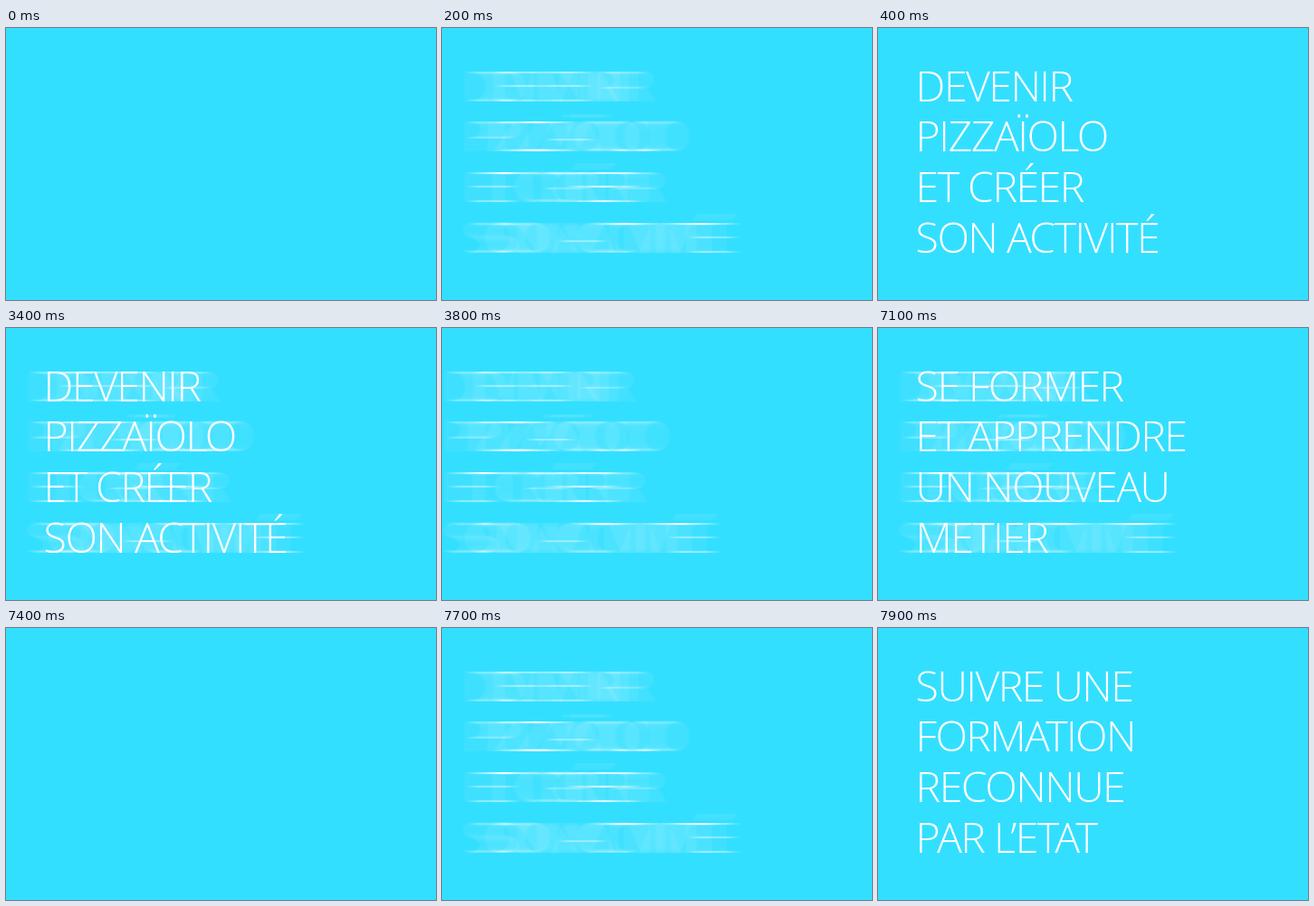
Animation of 475x300 px, one loop 8000 ms. Source, as an HTML page with a canvas:

```html
<!DOCTYPE html>
<html lang="fr">
<head>
<meta charset="utf-8">
<title>Formation</title>
<style>
  html, body { margin: 0; width: 100%; height: 100%; overflow: hidden; background: #33dfff; }
  canvas { display: block; }
</style>
</head>
<body>
<canvas id="stage" width="475" height="300"></canvas>
<script>
const W = 475, H = 300, LOOP = 8000;
const LEFT = 41.6, BASE = 80.7, LEADING = 55.65;
const REACH = 22;
const SLIDES = [
  ["DEVENIR", "PIZZAÏOLO", "ET CRÉER", "SON ACTIVITÉ"],
  ["SE FORMER", "ET APPRENDRE", "UN NOUVEAU", "METIER"],
  ["SUIVRE UNE", "FORMATION", "RECONNUE", "PAR L’ETAT"]
];
// When each slide starts to sweep in and out
const TIMES = [[100, 3400], [3800, 7100], [7600, Infinity]];

const ctx = document.getElementById("stage").getContext("2d");

function drawLines(c, lines, dx = 0) {
  c.font = '300 46.5px "Open Sans", "Noto Sans", sans-serif';
  c.letterSpacing = "-1.55px";
  c.fillStyle = "#fff";
  lines.forEach((line, i) => c.fillText(line, LEFT + dx, Math.round(BASE + i * LEADING)));
}

// Horizontal motion blur: the average of many shifted copies
function makeStreak(lines) {
  const canvas = document.createElement("canvas");
  canvas.width = W;
  canvas.height = H;
  const c = canvas.getContext("2d");
  c.globalCompositeOperation = "lighter";
  c.globalAlpha = 1 / (2 * REACH + 1);
  for (let dx = -REACH; dx <= REACH; dx++) drawLines(c, lines, dx);
  return canvas;
}

const streak = makeStreak(SLIDES[0]);

// Stage of a sweep: 0 nothing, 1 shifted streak, 2 streak, 3 streak and text, 4 text
function stageAt(t, [start, end]) {
  const step = a => Math.floor((t - a) / 100);
  if (t < start) return 0;
  if (t < end) return Math.min(4, step(start) + 1);
  return Math.max(0, 3 - step(end));
}

function render(t) {
  ctx.fillStyle = "#33dfff";
  ctx.fillRect(0, 0, W, H);
  SLIDES.forEach((lines, i) => {
    const stage = stageAt(t, TIMES[i]);
    if (stage > 0 && stage < 4) ctx.drawImage(streak, stage === 1 ? -REACH : 0, 0);
    if (stage > 2) drawLines(ctx, lines);
  });
}

const begin = performance.now();
function tick() {
  render((performance.now() - begin) % LOOP);
  requestAnimationFrame(tick);
}
tick();
</script>
</body>
</html>
```
